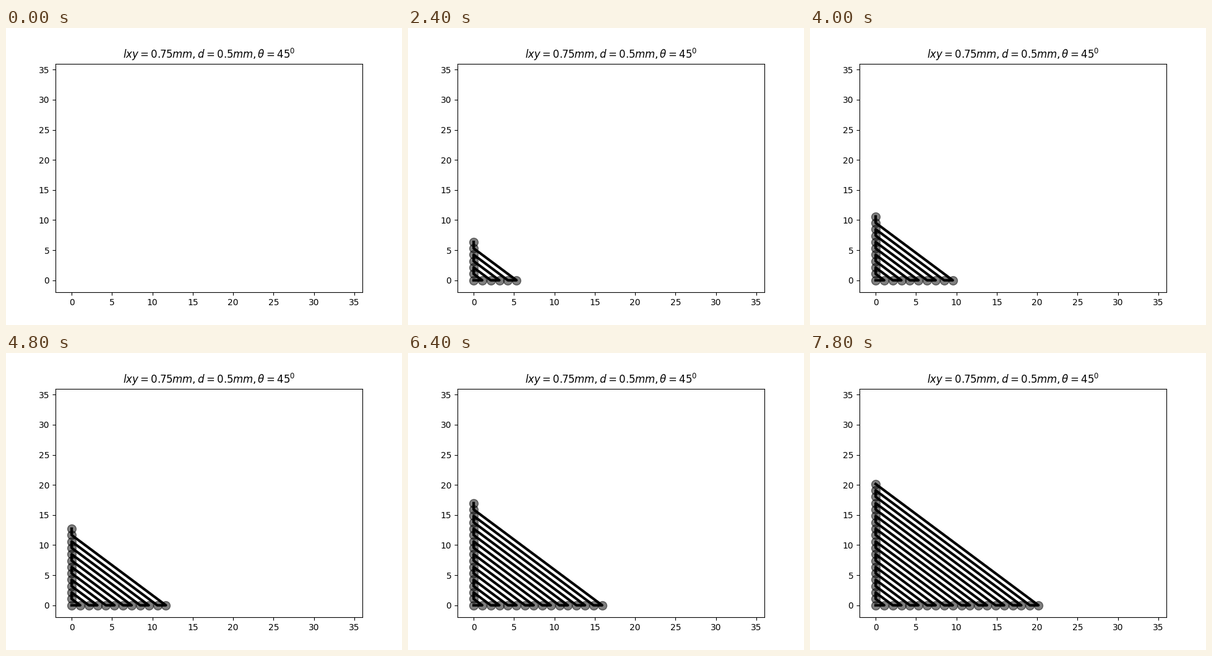
Write a matplotlib script that moves like this. It is 640 px wide and 480 px high and loops after 8 s.

```python
import math

import matplotlib.pyplot as plt
from matplotlib.animation import FuncAnimation

FRAMES = 40
INTERVAL = 200
PITCH = 0.75 * math.sqrt(2)


def zigzag(k):
    """Point k of a path that swaps between the two axes every two points."""
    pair = k // 2
    r = PITCH * (pair + k % 2)
    return (r, 0) if pair % 2 == 0 else (0, r)


path = [zigzag(k) for k in range(FRAMES)]

fig, ax = plt.subplots(figsize=(6.4, 4.8), dpi=100)
ax.set_xlim(-2, 36)
ax.set_ylim(-2, 36)
ax.set_title(r"$lxy=0.75mm, d=0.5mm, \theta=45^0$")

dots, = ax.plot([], [], "o", color="black", markersize=10, alpha=0.5)
line, = ax.plot([], [], color="black", linewidth=3)


def update(n):
    xs = [x for x, _ in path[:n]]
    ys = [y for _, y in path[:n]]
    dots.set_data(xs, ys)
    line.set_data(xs, ys)
    return dots, line


anim = FuncAnimation(fig, update, frames=FRAMES, interval=INTERVAL,
                     init_func=lambda: update(0), repeat=True, repeat_delay=0)

plt.show()
```
